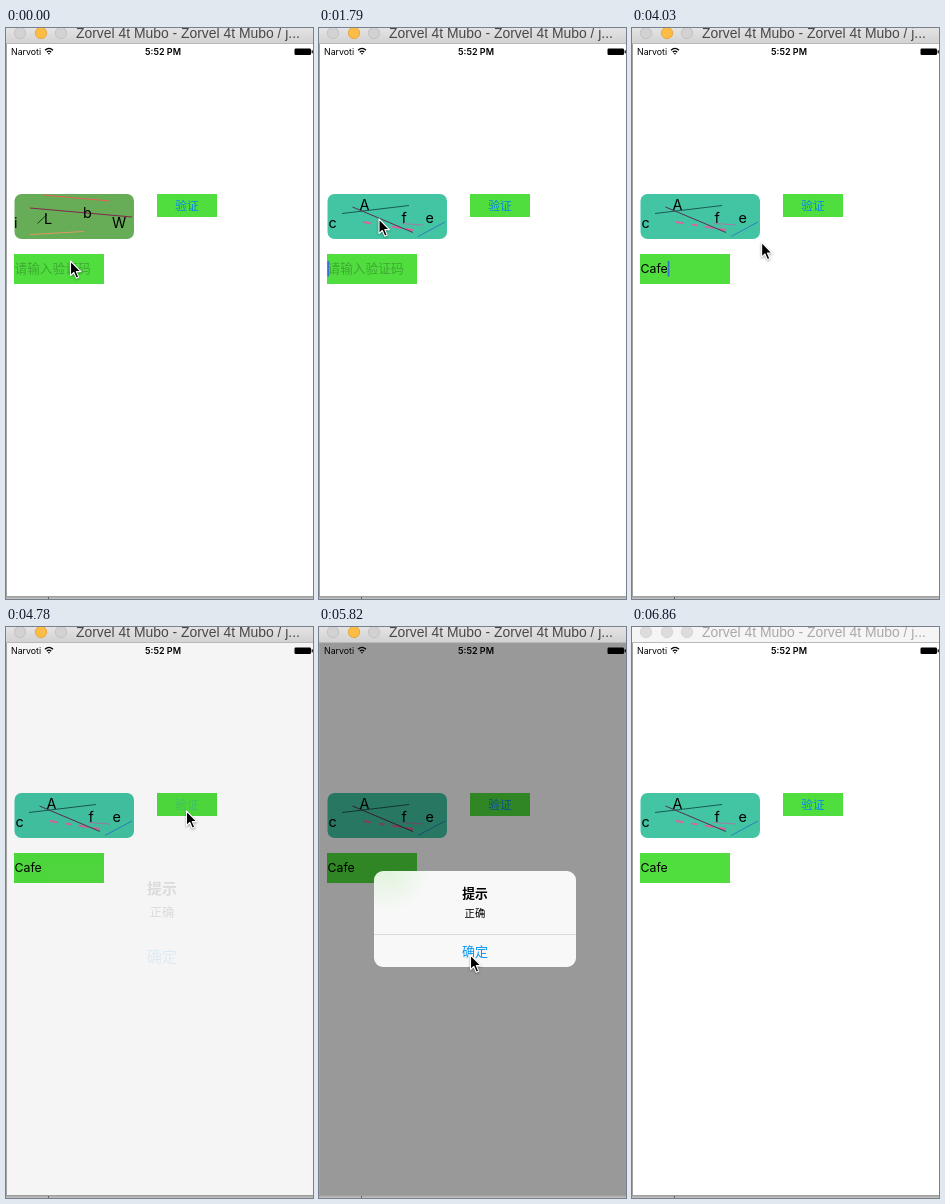
An HTML page that plays this animation: 307 by 571 pixels, repeating every 6.96 s.

```html
<!DOCTYPE html>
<html lang="zh">
<head>
<meta charset="utf-8">
<title>验证码</title>
<style>
  html, body { margin: 0; width: 100%; height: 100%; overflow: hidden; background: #fff; }
  svg { display: block; width: 307px; height: 571px; }
  text { font-family: Inter, "Noto Sans CJK SC", "Noto Sans CJK", sans-serif; }
  .mid { text-anchor: middle; }
  .code text { font-size: 14.4px; }
  .code path { fill: none; }
  .lights circle { fill: #d2d2d2; stroke: #bdbdbd; stroke-width: .8; }
  .lights .minimise { fill: #fdbd45; stroke: #dfa03a; }
  #title { fill: #484848; font: 13.9px "Liberation Sans", Arial, sans-serif; }
  .inactive #bar { fill: #f5f5f5; }
  .inactive #title { fill: #a9a9a9; }
  .inactive .lights circle { fill: #dcdcdc; stroke: #d0d0d0; }
  #pointer { filter: drop-shadow(0 1px .8px rgba(0, 0, 0, .35)); }
</style>
</head>
<body>
<svg id="stage" viewBox="0 0 307 571">
  <defs>
    <linearGradient id="chrome" x2="0" y2="1">
      <stop stop-color="#e4e4e4"/><stop offset="1" stop-color="#d2d2d2"/>
    </linearGradient>
    <linearGradient id="shade" x2="0" y2="1">
      <stop stop-color="#989898"/><stop offset="1" stop-color="#c6c6c6"/>
    </linearGradient>
    <radialGradient id="tint" gradientUnits="userSpaceOnUse" cx="68" cy="242" r="44">
      <stop stop-color="#e0f4dd"/><stop offset=".5" stop-color="#ecf6ea"/>
      <stop offset="1" stop-color="#f8f8f8"/>
    </radialGradient>
  </defs>

  <rect width="307" height="571" fill="#fff"/>
  <rect id="bar" width="307" height="15" fill="url(#chrome)"/>
  <path d="M0 15.5H307" stroke="#b9b9b9"/>
  <g class="lights">
    <circle cx="14" cy="5" r="5.7"/>
    <circle class="minimise" cx="35" cy="5" r="5.7"/>
    <circle cx="55" cy="5" r="5.7"/>
  </g>
  <text id="title" x="70" y="10">Zorvel 4t Mubo - Zorvel 4t Mubo / j...</text>

  <text x="5" y="27" font-size="8.8">Narvoti</text>
  <path d="M39 22.3Q43 18.5 47 22.3M40.8 24.2Q43 22 45.2 24.2"
        fill="none" stroke="#000" stroke-width="1.3"/>
  <path d="M41.9 25.4Q43 24.6 44.1 25.4L43 26.8Z"/>
  <text class="mid" x="157" y="27" font-size="9" font-weight="600">5:52 PM</text>
  <rect x="288.5" y="20.5" width="16.5" height="6.5" rx="1.2"/>
  <rect x="305.6" y="22.3" width="1.2" height="3"/>

  <g class="code" id="first">
    <rect x="8.5" y="166" width="119.5" height="45" rx="7" fill="#67ad57"/>
    <path d="M37 167L104 173" stroke="#e85f56"/>
    <path d="M24 180L126 189" stroke="#84254f"/>
    <path d="M24 206.5L78 203.5" stroke="#d99a64"/>
    <path d="M31.5 195.5L41 186.5" stroke="#173c18"/>
    <text x="8" y="200">i</text><text x="38" y="196">L</text>
    <text x="77" y="190">b</text><text x="106" y="200" font-size="12">W</text>
  </g>
  <g class="code" id="second">
    <rect x="8.5" y="166" width="119.5" height="45" rx="7" fill="#43c5a3"/>
    <path d="M44 194L94 202" stroke="#dc62a0" stroke-width="1.8" stroke-dasharray="8 8 6 7 10 4"/>
    <path d="M82 195.5L104 197" stroke="#a57ba8"/>
    <path d="M23 185.5L90 177.5" stroke="#1b5a50"/>
    <path d="M33.5 179L94 204.5" stroke="#5b2d50"/>
    <path d="M99 208.5L126 194" stroke="#2c80bd"/>
    <text x="9.5" y="200">c</text><text x="40.5" y="181.5">A</text>
    <text x="82.5" y="195">f</text><text x="106.5" y="195">e</text>
  </g>

  <rect x="151" y="166" width="60" height="23" fill="#50de3e"/>
  <text id="verify" class="mid" x="181" y="181.5" font-size="11.7" fill="#0a86e8">验证</text>

  <rect x="8" y="226" width="90" height="30" fill="#50de3e"/>
  <text id="hint" x="8.5" y="245.3" font-size="12.7" fill="#3eaa33">请输入验证码</text>
  <text id="entry" x="8.5" y="245" font-size="12.3"></text>
  <rect id="caret" y="233" width="1.8" height="15.5" fill="#3a6fd8"/>

  <rect id="dim" x="1" y="16" width="306" height="552"/>
  <g id="alert">
    <g id="panel">
      <rect x="55" y="244" width="202" height="96" rx="9" fill="url(#tint)"/>
      <path d="M55 307.5H257" stroke="#dadada"/>
    </g>
    <g id="message">
      <text class="mid" x="156" y="271" font-size="12.8" font-weight="600">提示</text>
      <text class="mid" x="156" y="290" font-size="10.4">正确</text>
      <text class="mid" x="156" y="329" font-size="13" fill="#0795f4">确定</text>
    </g>
  </g>

  <path d="M.5 16V568" stroke="#a3a3a3"/>
  <rect y="568" width="307" height="3" fill="url(#shade)"/>
  <path d="M42.5 569V571" stroke="#666"/>

  <path id="pointer" d="M0 0V14.6L3.3 11.5L5.8 17.2L8.2 16.1L5.8 10.6H10.4Z"
        stroke="#fff" stroke-width="1.1" stroke-linejoin="round"/>
</svg>
<script>
  // The screen refreshes in even ticks; everything below is counted in ticks.
  const LOOP = 6960, TICK = 149.2, LEAD = 8;
  const NEW_CODE = 6, PRESS = 31, OPEN = 32, CLOSE = 40, LEAVE = 44, BLUR = 46;

  const moves = [
    { from: 0, to: 3, x: 60, y: 191 },
    { from: 12, to: 15, x: 69, y: 241 },
    { from: 15, to: 19, x: 102, y: 231 },
    { from: 25, to: 30, x: 180.5, y: 184 },
    { from: 33, to: 39, x: 151.5, y: 328 },
    { from: 39, to: 40, x: 166.5, y: 339 },
    { from: 40, to: LEAVE, x: 215, y: 600 }
  ];

  const el = id => document.getElementById(id);
  const set = (id, name, value) => el(id).setAttribute(name, value);
  const show = (id, on) => set(id, "visibility", on ? "visible" : "hidden");
  const clamp = (v, lo, hi) => Math.min(hi, Math.max(lo, v));
  const smooth = p => p * p * (3 - 2 * p);

  function pointerAt(tick) {
    let x = 64.5, y = 233;
    for (const move of moves) {
      const p = smooth(clamp((tick - move.from) / (move.to - move.from), 0, 1));
      x += (move.x - x) * p;
      y += (move.y - y) * p;
    }
    return `translate(${x} ${y})`;
  }

  function alertOpacity(tick) {
    if (tick < OPEN) return 0;
    return tick < CLOSE ? 1 - .9 * .25 ** (tick - OPEN) : .12 ** (tick - CLOSE + 1);
  }

  function draw(tick) {
    // Two bursts of two keystrokes.
    const text = "Cafe".slice(0, clamp(tick - 17, 0, 2) + clamp(tick - 23, 0, 2));
    const opacity = alertOpacity(tick);
    const scale = tick < CLOSE ? 1 + .19 * (1 - opacity) : 1;

    set("pointer", "transform", pointerAt(tick));
    show("pointer", tick < LEAVE);
    show("first", tick < NEW_CODE);
    show("second", tick >= NEW_CODE);

    show("hint", !text);
    el("entry").textContent = text;
    set("caret", "x", 8.4 + el("entry").getComputedTextLength());
    show("caret", tick > 0 && tick < PRESS || tick >= CLOSE && tick < LEAVE);
    set("verify", "opacity", tick === PRESS || tick === OPEN ? .25 : 1);

    set("dim", "opacity", .4 * opacity);
    set("panel", "opacity", opacity ** 2);
    set("message", "opacity", opacity);
    set("alert", "transform", `translate(156 292) scale(${scale}) translate(-156 -292)`);
    el("stage").classList.toggle("inactive", tick >= BLUR);
  }

  const start = performance.now();
  function run(now) {
    const time = Math.max(0, now - start) % LOOP;
    draw(Math.floor((time + LEAD) / TICK));
    requestAnimationFrame(run);
  }
  draw(0);
  requestAnimationFrame(run);
</script>
</body>
</html>
```
